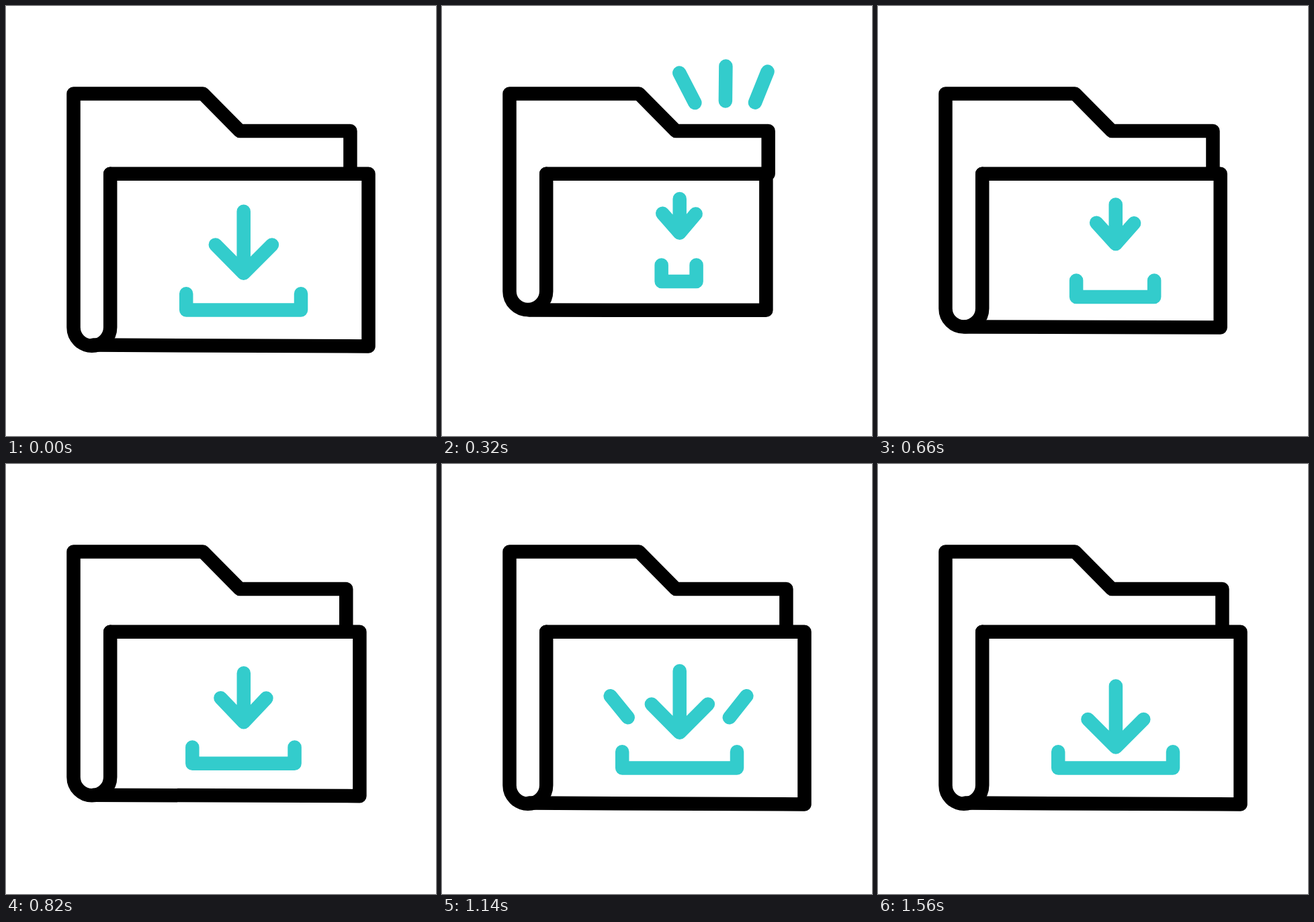
An HTML page for the animation above (2.4 s loop, 640 by 640 pixels).

```html
<!DOCTYPE html>
<html lang="en">
<head>
<meta charset="utf-8">
<title>Download folder</title>
<style>
  html, body { margin: 0; width: 100%; height: 100%; overflow: hidden; background: #fff; }
  svg { display: block; width: 100%; height: 100%; }
  path {
    fill: none; stroke: #000; stroke-width: 20.5;
    stroke-linecap: round; stroke-linejoin: round;
    animation: 2400ms cubic-bezier(.333, 0, .667, 1) infinite;
  }
  .accent path { stroke: #3cc; }

  .back  { d: path("M155.2 249.8V478.3A27.35 27.35 0 0 1 100.5 478.3V130.4H293L348 186H512.4V249.8"); animation-name: back; }
  .front { d: path("M155.2 249.8H539.5V506.5L130 504.6"); animation-name: front; }
  .tray  { d: path("M268.2 428.2V452.5H439V428.2"); animation-name: tray; }
  .arrow { d: path("M353.7 305.7V397.7M311.8 355.4L353.7 397.7L395.9 355.4"); animation-name: arrow; }

  /* squash until 275 ms, relax until 1065 ms */
  @keyframes back {
    11.458% { d: path("M155.2 249.8V424.1A27.35 27.35 0 0 1 100.5 424.1V130.4H293L348 186H485.4V249.8"); }
    44.375%, 100% { d: path("M155.2 249.8V478.3A27.35 27.35 0 0 1 100.5 478.3V130.4H293L348 186H512.4V249.8"); }
  }
  @keyframes front {
    11.458% { d: path("M155.2 249.8H481.8V452.3L130 452"); }
    44.375%, 100% { d: path("M155.2 249.8H539.5V506.5L130 504.6"); }
  }
  @keyframes tray {
    11.667% { d: path("M327.2 385.2V409.5H378V385.2"); }
    41.667%, 100% { d: path("M268.2 428.2V452.5H439V428.2"); }
  }
  /* shrink, drop onto the tray, bob up and settle */
  @keyframes arrow {
    10.417% {
      d: path("M353.7 286.8V337.3M328.3 308.4L353.7 337.3L377.6 309.2");
      animation-timing-function: cubic-bezier(.7, 0, .9, .45);
    }
    37.5%, 65%, 100% { d: path("M353.9 330.6V421.5M312.4 380L353.9 421.5L395.3 380"); }
    49.792% { d: path("M353.7 305.7V397.7M311.8 355.4L353.7 397.7L395.9 355.4"); }
  }

  /* each line grows from its base, then its tail catches up */
  .spark { opacity: 0; stroke-dasharray: 0 200; animation-name: spark; }
  .late .spark { animation-delay: 875ms; }
  @keyframes spark {
    0%, 3.333% { opacity: 0; stroke-dasharray: 0 200; stroke-dashoffset: 0; }
    3.334% { opacity: 1; stroke-dasharray: 0 200; stroke-dashoffset: 0; }
    11.458% { opacity: 1; stroke-dasharray: 100 200; stroke-dashoffset: 0; }
    17.5% { opacity: 1; stroke-dasharray: 0 200; stroke-dashoffset: -100; }
    17.501%, 100% { opacity: 0; stroke-dasharray: 0 200; stroke-dashoffset: -100; }
  }
</style>
</head>
<body>
<svg viewBox="0 0 640 640">
  <path class="back"/>
  <path class="front"/>
  <g class="accent">
    <path class="tray"/>
    <path class="arrow"/>
    <path class="spark" pathLength="100" d="M383.5 158L353.3 99.5"/>
    <path class="spark" pathLength="100" d="M421.7 157.6L422.4 89.6"/>
    <path class="spark" pathLength="100" d="M460.2 158L484.5 97.6"/>
    <g class="late">
      <path class="spark" pathLength="100" d="M276.7 377.3L250.5 345"/>
      <path class="spark" pathLength="100" d="M427.8 377.3L453.5 345"/>
    </g>
  </g>
</svg>
</body>
</html>
```
